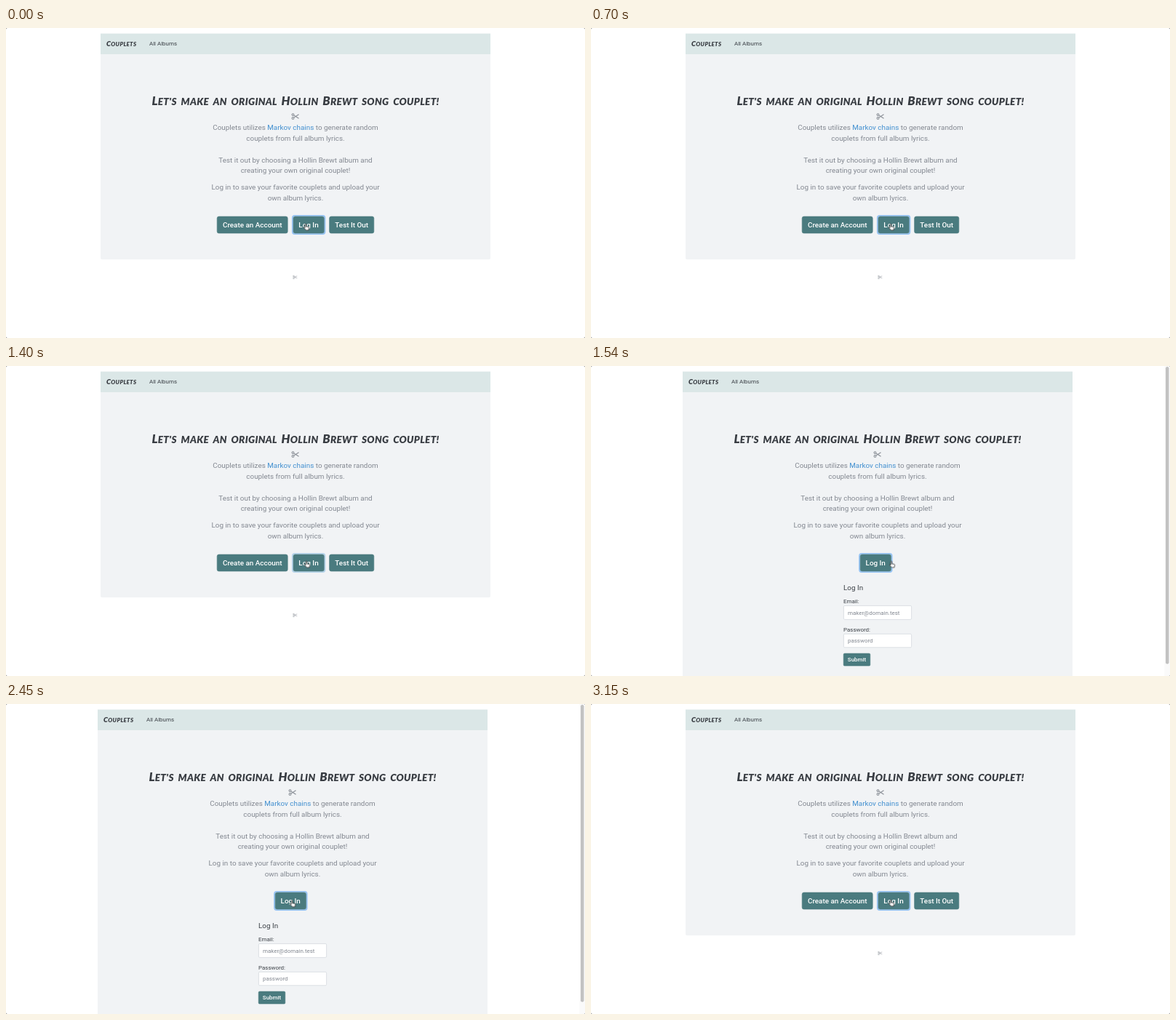
An HTML page that plays this animation: 796 by 426 pixels, repeating every 3500 ms.

```html
<!DOCTYPE html>
<html lang="en">
<head>
<meta charset="utf-8">
<title>Couplets</title>
<style>
  html, body { margin: 0; width: 100%; height: 100%; overflow: hidden; background: #777; }
  svg { display: block; width: 796px; height: 426px; background: #fff; border-radius: 2px; }

  text { font: 9.9px Roboto, sans-serif; fill: #838891; white-space: pre; }
  .mid { text-anchor: middle; }
  .link { fill: #4390d0; }
  .small { font-size: 7.95px; }
  .dark { fill: #3c4147; }
  .marker { font: italic 900 13.5px Lato, sans-serif; fill: #383c42; letter-spacing: .3px; word-spacing: 2.7px; }
  .marker.brand { font-size: 7.9px; }
  .cap { font-size: 1.23em; }
  .btn rect { fill: #4a7b7f; stroke: #4a7b7f; stroke-width: .6; }
  .btn text { fill: #fff; font-weight: 500; text-anchor: middle; }
  .field { fill: #fff; stroke: #d5dadf; stroke-width: .8; }
  .ring { fill: none; stroke: #94c2f3; stroke-width: 1.9; }
  .snip { fill: none; stroke: #858a92; stroke-width: 1.05; }

  .page, .home, .login, .ring, .hand, .beam, .pointer { animation: 3500ms infinite step-end; }
  .page { animation-name: shift; }
  .home { animation-name: home; }
  .login { animation-name: login; }
  .home .ring { animation-name: press; }
  .pointer { animation-name: move; animation-timing-function: linear; }
  .hand { animation-name: hand; }
  .beam { animation-name: beam; }

  /* the scrollbar pushes the centred page to the left */
  @keyframes shift { 0%, 74%, 100% { transform: none; } 44% { transform: translateX(-4px); } }
  @keyframes home { 0%, 74%, 100% { visibility: visible; } 44% { visibility: hidden; } }
  @keyframes login { 0%, 74%, 100% { visibility: hidden; } 44% { visibility: visible; } }
  @keyframes press { 0%, 44%, 100% { stroke: #94c2f3; } 40% { stroke: #b4d3ea; } }
  @keyframes hand { 0%, 76%, 100% { visibility: visible; } 74% { visibility: hidden; } }
  @keyframes beam { 0%, 76%, 100% { visibility: hidden; } 74% { visibility: visible; } }
  @keyframes move {
    0%, 38% { transform: translate(411.2px, 269.6px); }
    40% { transform: translate(412.2px, 268.6px); }
    46% { transform: translate(412.2px, 268.6px); animation-timing-function: ease-in-out; }
    58%, 74% { transform: translate(392.4px, 270.5px); }
    76% { transform: translate(397px, 270.3px); animation-timing-function: ease-out; }
    80%, 100% { transform: translate(411.2px, 269.6px); }
  }
</style>
</head>
<body>
<svg viewBox="0 0 796 426">
  <defs>
    <g id="snip" class="snip">
      <circle cx="2" cy="2.1" r="1.4"/>
      <circle cx="2" cy="6.9" r="1.4"/>
      <path d="M3.2 2.9L10 7.3M3.2 6.1L10 1.7"/>
    </g>
  </defs>

  <g class="page">
    <rect x="130" y="8" width="536" height="310" rx="2" fill="#f1f3f5"/>
    <rect x="130" y="7.6" width="536" height="28.4" fill="#dbe7e7"/>
    <text class="marker brand" x="138" y="25"><tspan class="cap">C</tspan>OUPLETS</text>
    <text class="small dark" x="197" y="24">All Albums</text>

    <text class="marker mid" x="398" y="106"><tspan class="cap">L</tspan>ET'S MAKE AN ORIGINAL <tspan class="cap">H</tspan>OLLIN <tspan class="cap">B</tspan>REWT SONG COUPLET!</text>
    <use href="#snip" x="392.5" y="117"/>
    <g class="mid">
      <text x="398" y="139.6">Couplets utilizes <tspan class="link">Markov chains</tspan> to generate random</text>
      <text x="398" y="154.5">couplets from full album lyrics.</text>
      <text x="398" y="184.5">Test it out by choosing a Hollin Brewt album and</text>
      <text x="398" y="199.4">creating your own original couplet!</text>
      <text x="398" y="222.2">Log in to save your favorite couplets and upload your</text>
      <text x="398" y="237.1">own album lyrics.</text>
    </g>
  </g>

  <g class="home">
    <rect class="ring" x="393.9" y="257.9" width="44.5" height="25.2" rx="3"/>
    <g class="btn">
      <rect x="290.2" y="259" width="97" height="23" rx="2.5"/>
      <text x="338.8" y="274">Create an Account</text>
      <rect x="395" y="259" width="42.3" height="23" rx="2.5"/>
      <text x="416" y="274">Log In</text>
      <rect x="444.6" y="259" width="61.2" height="23" rx="2.5"/>
      <text x="475.2" y="274">Test It Out</text>
    </g>
    <use href="#snip" transform="translate(394.3 339.8) scale(.58)"/>
  </g>

  <g class="login">
    <rect x="126" y="310" width="536" height="116" fill="#f1f3f5"/>
    <rect class="ring" x="369.1" y="257.9" width="44.5" height="25.2" rx="3"/>
    <g class="btn">
      <rect x="370.2" y="259" width="42.3" height="23" rx="2.5"/>
      <text x="391.2" y="274">Log In</text>
    </g>

    <text class="dark" x="347" y="308">Log In</text>
    <text class="small dark" x="347" y="326">Email:</text>
    <rect class="field" x="347.4" y="329.4" width="93.2" height="19" rx="1.5"/>
    <text class="small" x="353" y="341.6">maker@domain.test</text>
    <text class="small dark" x="347" y="365">Password:</text>
    <rect class="field" x="347.4" y="368.2" width="93.2" height="18.6" rx="1.5"/>
    <text class="small" x="353" y="380">password</text>
    <g class="btn">
      <rect x="347.2" y="395" width="36.6" height="17" rx="1.5"/>
      <text class="small" x="365.5" y="406.4">Submit</text>
    </g>

    <rect x="788.5" width="7.5" height="426" fill="#fafafa"/>
    <rect x="790" y="1" width="4.5" height="408.5" rx="2.2" fill="#c2c2c2"/>
  </g>

  <g class="pointer">
    <path class="hand" fill="#fff" stroke="#222" stroke-width=".8" stroke-linejoin="round"
      d="M0 .5Q0-.5 .8-.5T1.6 .5V3.2L4.6 3.8Q5.6 4.1 5.4 5.2L4.8 8.2H1.4L-1.5 5.2Q-2.1 4.1-1.1 4L0 4.7z"/>
    <path class="beam" fill="none" stroke="#555" stroke-width=".8"
      d="M-1.6-4.4Q0-4.4 0-3.2Q0-4.4 1.6-4.4M0-3.2V3.4M-1.6 4.6Q0 4.6 0 3.4Q0 4.6 1.6 4.6"/>
  </g>
</svg>
</body>
</html>
```
